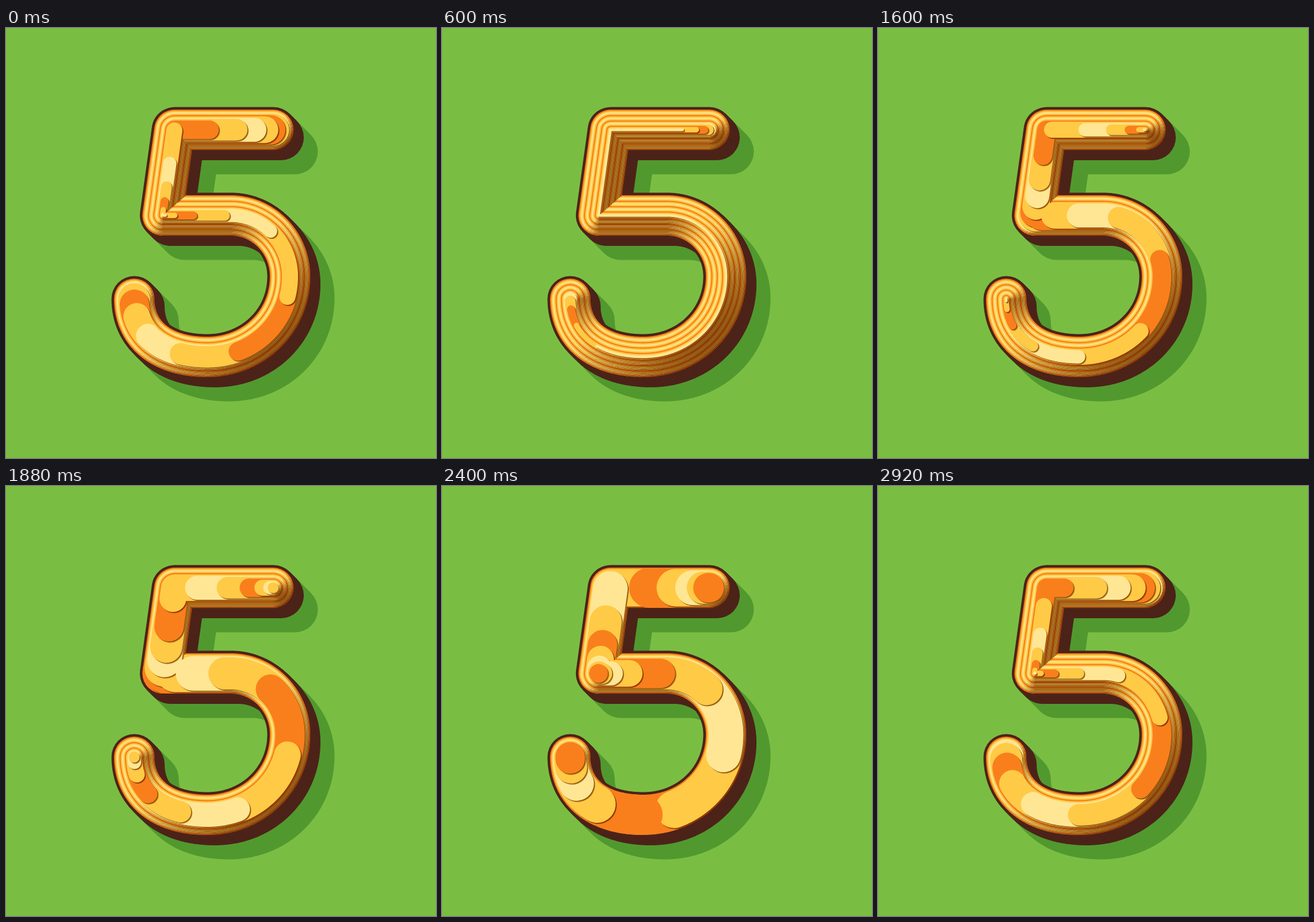
An HTML page with a canvas for the animation above (2960 ms loop, 748 by 748 pixels).

```html
<!DOCTYPE html>
<html lang="en">
<head>
<meta charset="utf-8">
<title>Five</title>
<style>
  html, body { margin: 0; width: 100%; height: 100%; overflow: hidden; background: #79be43; }
  canvas { display: block; width: 748px; height: 748px; }
</style>
</head>
<body>
<canvas id="stage" width="748" height="748"></canvas>
<script>
const SIZE = 748, LOOP = 2960, LAYERS = 15, STAGGER = 80, SWEEP = 1000;
const GROW_AT = -1204, ERASE_AT = 1796;
const RADIUS = 35, STEP = 2.33;
const GREEN = '#79be43', SHADE = '#51992f', DARK = '#4c2319';
const COLORS = ['#f97f1d', '#ffca45', '#ffe694', '#ffca45'];
const EDGE = 'rgb(185,150,85)';

// Both halves start at the lower left corner of the numeral.
const top5 = sample('M272.3 326 L293 177 H465');
const bowl = sample('M272.3 326 H391 A103 106 0 0 1 494 432 C494 511 431 572 350 572 C270 572 223 532 223 471');

const easeGrow = bezier(.6, .4);
const easeTop = bezier(.6, .47);

const ctx = document.getElementById('stage').getContext('2d');
const backdrop = drawBackdrop();

function sample(d) {
  const path = document.createElementNS('http://www.w3.org/2000/svg', 'path');
  path.setAttribute('d', d);
  const length = path.getTotalLength(), n = Math.round(length);
  return Array.from({ length: n + 1 }, (_, i) => path.getPointAtLength(length * i / n));
}

// Easing curve with control points (x1, 0) and (x2, 1).
function bezier(x1, x2) {
  return x => {
    if (x <= 0) return 0;
    if (x >= 1) return 1;
    let lo = 0, hi = 1;
    for (let k = 0; k < 24; k++) {
      const t = (lo + hi) / 2, u = 1 - t;
      if (3 * u * u * t * x1 + 3 * u * t * t * x2 + t * t * t < x) lo = t; else hi = t;
    }
    return lo * lo * (3 - 2 * lo);
  };
}

function pointAt(pts, f) {
  const x = f * (pts.length - 1), i = Math.min(Math.floor(x), pts.length - 2), k = x - i;
  const a = pts[i], b = pts[i + 1];
  return [a.x + (b.x - a.x) * k, a.y + (b.y - a.y) * k];
}

function addTrim(path, pts, from, to) {
  const n = pts.length - 1;
  const [x, y] = pointAt(pts, from);
  path.moveTo(x, y);
  for (let i = Math.floor(from * n) + 1; i < to * n; i++) path.lineTo(pts[i].x, pts[i].y);
  const [ex, ey] = pointAt(pts, to);
  path.lineTo(ex + .01, ey);
}

function strokeAt(c, path, color, offset, blend = 'source-over') {
  c.save();
  c.globalCompositeOperation = blend;
  c.translate(offset, offset);
  c.strokeStyle = color;
  c.stroke(path);
  c.restore();
}

function roundPen(c, radius) {
  c.lineCap = c.lineJoin = 'round';
  c.lineWidth = radius * 2;
}

function drawBackdrop() {
  const canvas = document.createElement('canvas');
  canvas.width = canvas.height = SIZE;
  const c = canvas.getContext('2d');
  c.fillStyle = GREEN;
  c.fillRect(0, 0, SIZE, SIZE);
  const path = new Path2D();
  addTrim(path, top5, 0, 1);
  addTrim(path, bowl, 0, 1);
  roundPen(c, 39.5);
  for (let d = 38; d > 13; d -= .75) strokeAt(c, path, SHADE, d);
  for (let d = 13.5; d >= 0; d -= .5) strokeAt(c, path, DARK, d);
  return canvas;
}

function drawLayer(i, time) {
  const grown = (time - GROW_AT - STAGGER * i) / SWEEP;
  const erased = (time - ERASE_AT + STAGGER * i) / SWEEP;
  if (grown < 0 || erased >= 1) return;
  const end = easeGrow(grown);
  const path = new Path2D();
  addTrim(path, top5, Math.min(easeTop(erased), end), end);
  addTrim(path, bowl, Math.min(easeGrow(erased), end), end);
  roundPen(ctx, RADIUS - STEP * i);
  if (i > 0) {
    strokeAt(ctx, path, EDGE, 2, 'multiply');
    strokeAt(ctx, path, EDGE, 1, 'multiply');
  }
  strokeAt(ctx, path, COLORS[i % 4], 0);
}

function frame(now) {
  const time = now % LOOP;
  ctx.drawImage(backdrop, 0, 0);
  // The next pass grows underneath the one being erased.
  for (const t of [time - LOOP, time]) {
    for (let i = 0; i < LAYERS; i++) drawLayer(i, t);
  }
}

const begin = performance.now();
function tick() {
  frame(performance.now() - begin);
  requestAnimationFrame(tick);
}
tick();
</script>
</body>
</html>
```
